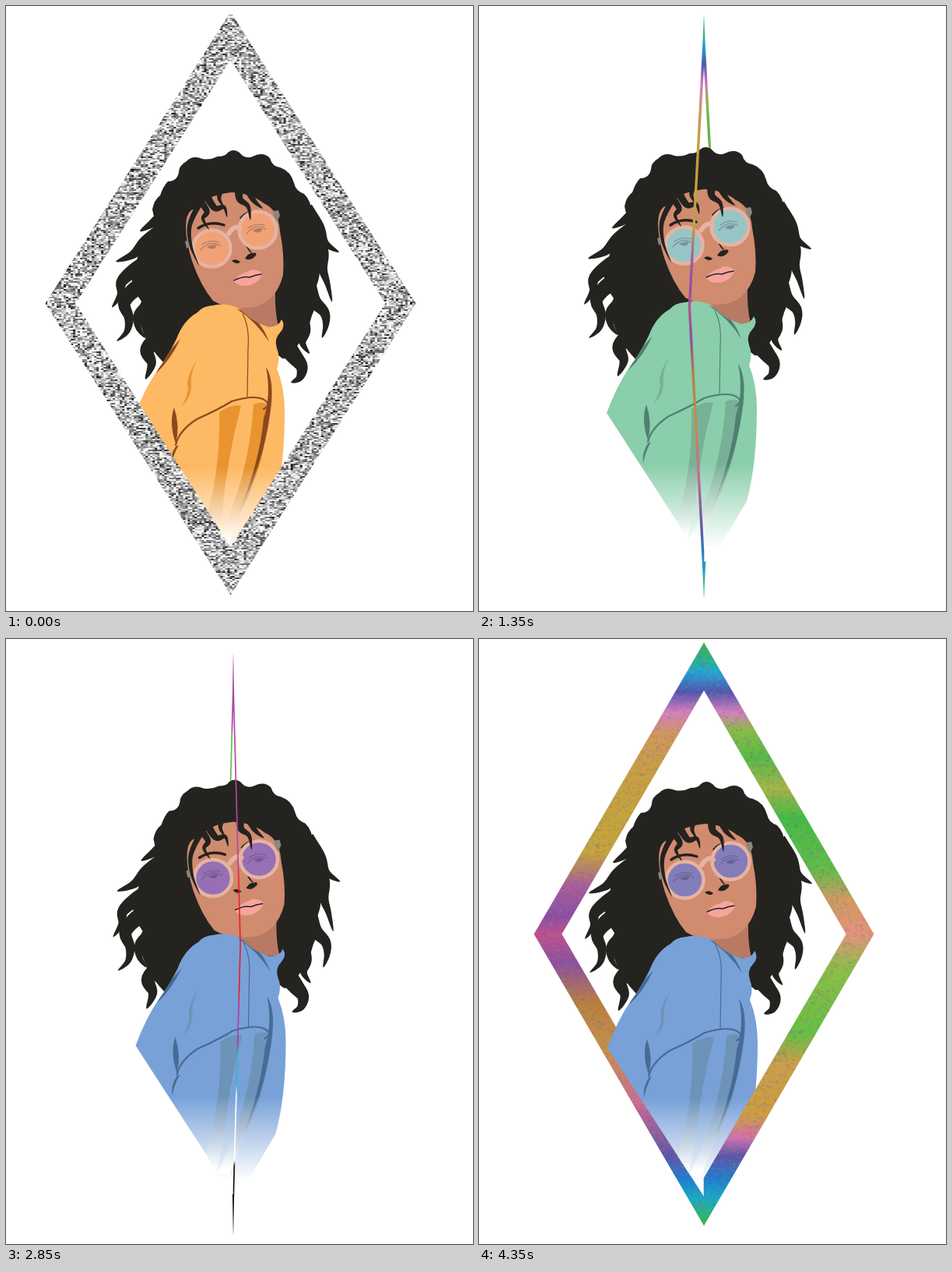
Write an HTML page with a canvas that moves like this. It is 600x776 px and loops after 4450 ms.

```html
<!DOCTYPE html>
<html lang="en">
<head>
<meta charset="utf-8">
<title>Turning diamond portrait</title>
<style>
html, body { margin: 0; width: 100%; height: 100%; overflow: hidden; background: #fff; }
canvas { display: block; width: 600px; height: 776px; }
</style>
</head>
<body>
<canvas id="stage" width="600" height="776"></canvas>
<script>
const LOOP = 4450, HALF_W = 238, HALF_H = 374.5, INNER = 0.836;
const ctx = document.getElementById('stage').getContext('2d');

// time, turn angle, diamond x, diamond y, portrait dx, portrait dy
const KEYS = [
  [0, 0, 288.5, 381.5, 0, -1],
  [600, 62.2, 289, 380.5, 0, 0],
  [1350, 85.1, 289, 386, -1, -5],
  [2050, 89.6, 293, 392.5, 2, -6],
  [2850, 92.4, 292, 391.5, 1.5, -5.5],
  [3650, 109.3, 288.5, 385, 0, -1.5],
  [4050, 130.4, 288.7, 379.5, 0, -2.5],
  [4350, 156.6, 289, 378.5, 0, -3],
  [4450, 170, 288.5, 381, 0, -1]
];

const SHIRTS = {
  yellow: ['#fdb964', '#e8942f', '#8c481d'],
  mint: ['#8aceab', '#78b197', '#4f8072'],
  lime: ['#a1d35b', '#90b364', '#6a8d3d'],
  blue: ['#78a1d8', '#6d93b9', '#466c96'],
  pink: ['#c577b9', '#ad70a8', '#89517f']
};

// until, shirt, lens, texture
const LOOKS = [
  [300, 'yellow', '#f0a276', 'noise'],
  [950, 'yellow', '#ee7a8a', 'collage'],
  [1700, 'mint', '#97c5c6', 'rainbow'],
  [2450, 'lime', '#97c5c6', 'noise'],
  [3250, 'blue', '#976fb4', 'threads'],
  [4000, 'pink', '#8fc47f', 'rainbow'],
  [LOOP, 'blue', '#837db9', 'rainbow']
];

const RAINBOW_TIP = '0 #3ab54a,.03 #2bb08a,.05 #1fa9d6,.085 #5156b0,';
const RAINBOW_END = ',.88 #5f55a8,.92 #1f7fd0,.95 #18a8c8,.98 #2eb380,1 #3ab54a';
const BANDS = {
  rainbow: [
    RAINBOW_TIP + '.12 #d77fc0,.16 #d0985c,.24 #c9a040,.36 #c4a53c,.42 #a85a9e,.47 #8a4fa5,.5 #c05090,.55 #8d50a0,.62 #b9803f,.7 #c8924a,.79 #cc6a94' + RAINBOW_END,
    RAINBOW_TIP + '.12 #d77fc0,.15 #8cbb4a,.2 #55bb46,.25 #a8b548,.3 #45bb45,.39 #62bd48,.44 #d29a62,.5 #e5937c,.56 #8cc044,.67 #66bf46,.72 #c9a04c,.81 #d09c40,.85 #d270b0' + RAINBOW_END
  ],
  collage: [
    '0 #888,.06 #c8c8cc,.12 #909090,.2 #b0b0b0,.245 #777,.265 #d8d040,.295 #eede20,.31 #e8201c,.39 #ee1c24,.41 #2bb7d6,.45 #35a0d0,.465 #7a369f,.7 #8e2c98,1 #9c2a94',
    '0 #888,.05 #bbb,.14 #f2f2f6,.165 #a2329c,.23 #a2329c,.25 #e89030,.265 #f0e428,.29 #c8dc30,.4 #2bb7b8,.6 #159ea8,.7 #1cb4bc,.77 #8e2c98,1 #9c2a94'
  ],
  threads: [
    '0 #a040a0,.13 #a84c9c,.15 #62c83c,.24 #58b848,.3 #667,.6 #69a,.75 #567,.88 #222,1 #111',
    '0 #b04aa4,.36 #b4489c,.39 #f02030,.58 #e81c28,.61 #b03ca0,.67 #b03ca0,.69 #30b8cc,.74 #30b8cc,.76 #fff,.87 #fff,.88 #111,1 #111'
  ]
};

function seeded(seed) {
  return () => {
    seed = (seed * 1664525 + 1013904223) >>> 0;
    return seed / 4294967296;
  };
}

function makeTexture(kind) {
  const rand = seeded(42), w = HALF_W * 2, h = HALF_H * 2;
  const canvas = document.createElement('canvas');
  canvas.width = w;
  canvas.height = h;
  const c = canvas.getContext('2d');
  if (kind === 'noise') {
    for (let y = 0; y < h; y += 2) {
      for (let x = 0; x < w; x += 3) {
        const v = Math.min(252, 5 + 175 * (rand() + rand()));
        c.fillStyle = `rgb(${v},${v},${v})`;
        c.fillRect(x, y, 3, 2);
      }
    }
    return canvas;
  }
  BANDS[kind].forEach((stops, side) => {
    const g = c.createLinearGradient(0, 0, 0, h);
    for (const stop of stops.split(',')) {
      const [at, color] = stop.split(' ');
      g.addColorStop(+at, color);
    }
    c.fillStyle = g;
    c.fillRect(side * w / 2, 0, w / 2, h);
  });
  if (kind === 'rainbow') {
    for (let i = 0; i < 26000; i++) {
      c.fillStyle = `hsla(${rand() * 360},60%,50%,.15)`;
      c.fillRect(rand() * w, rand() * h, 3, 2);
    }
  }
  if (kind === 'collage') {
    // woven strokes near the top
    for (let i = 0; i < 420; i++) {
      const x = rand() * w, y = rand() * h * 0.23, d = rand() < 0.5 ? 14 : -14;
      c.strokeStyle = rand() < 0.5 ? 'rgba(255,255,255,.45)' : 'rgba(60,60,65,.28)';
      c.lineWidth = 3;
      c.beginPath();
      c.moveTo(x - 18, y - d);
      c.lineTo(x + 18, y + d);
      c.stroke();
    }
  }
  return canvas;
}

const textures = {};
for (const kind of ['noise', ...Object.keys(BANDS)]) textures[kind] = makeTexture(kind);

const P = d => new Path2D(d);

// a curl through the given points, narrowing from its root to a sharp tip
function curl(width, text) {
  const pts = text.split(' ').map(p => p.split(',').map(Number));
  const at = i => pts[Math.max(0, Math.min(pts.length - 1, i))];
  const spline = (s, axis) => {
    const i = Math.min(Math.floor(s), pts.length - 2), u = s - i;
    const [a, b, c, d] = [-1, 0, 1, 2].map(k => at(i + k)[axis]);
    return b + u * (c - a + u * (2 * a - 5 * b + 4 * c - d + u * (3 * b - a - 3 * c + d))) / 2;
  };
  const left = [], right = [], n = 24, last = pts.length - 1;
  for (let k = 0; k <= n; k++) {
    const s = k / n * last, e = 0.02;
    const x = spline(s, 0), y = spline(s, 1);
    const s0 = Math.max(0, s - e), s1 = Math.min(last, s + e);
    const dx = spline(s1, 0) - spline(s0, 0), dy = spline(s1, 1) - spline(s0, 1);
    const r = width / 2 * Math.pow(1 - k / n, 0.75) / (Math.hypot(dx, dy) || 1);
    left.push([x - dy * r, y + dx * r]);
    right.unshift([x + dy * r, y - dx * r]);
  }
  return P('M' + [...left, ...right].join('L') + 'Z');
}

const HAIR = [
  P('M232 200Q240 192 252 197Q262 199 272 194Q282 194 285 189Q292 183 300 189Q307 198 317 194Q330 187 339 196Q342 207 352 208Q366 213 370 228Q372 238 383 242Q393 252 392 266Q400 276 403 292Q408 305 402 320Q406 345 398 362Q402 380 393 398Q388 420 372 440Q364 455 355 453L346 446 330 400 270 390 240 430 212 454 202 458Q185 440 178 424Q166 395 174 380Q160 360 162 346Q166 334 170 320Q174 305 188 290Q193 280 188 262Q190 250 198 244Q202 232 208 226Q220 226 222 214Q222 206 232 200Z'),
  curl(18, '204,268 188,280 172,290'),
  curl(24, '205,288 180,304 163,320 141,329'),
  curl(24, '195,325 168,338 149,354 147,371 136,388'),
  curl(24, '190,352 166,364 152,382 158,401 155,419 142,431'),
  curl(18, '190,380 171,396 170,413 179,427'),
  curl(26, '206,420 182,441 187,460 179,480'),
  curl(22, '384,262 401,285 410,305 428,317'),
  curl(20, '390,285 406,314 407,338 413,357 419,381'),
  curl(22, '386,350 395,378 409,394 411,410 406,427'),
  curl(20, '376,390 384,416 381,433 390,447'),
  curl(26, '356,432 370,450 380,464 377,478 366,484')
];
const NECK = P('M280 380L346 364Q345 392 350 412L325 412 292 390Z');
const FACE = P('M231 285Q231 268 238 263Q246 260 252 254Q266 242 290 240Q315 241 331 254Q350 262 352 290Q358 320 356 346Q351 366 338 378Q324 389 304 388Q282 389 266 379Q250 360 239 328Q231 302 231 285Z');
const FRINGE = [
  curl(8, '250,252 236,282 238,310 248,334'),
  curl(10, '245,246 258,264 253,274 261,288'),
  curl(11, '255,240 268,260 280,259 284,272'),
  curl(8, '276,236 274,248 280,259'),
  curl(12, '300,230 300,248 311,258 314,276'),
  curl(11, '310,234 318,250 330,261')
];
const MARKS = [
  [3.4, 'M247 286Q262 276 280 282'],
  [3.4, 'M302 273Q311 262 330 265'],
  [1.6, 'M307 301Q309 312 315 317']
].map(([w, d]) => [w, P(d)]);
const NOSE = P('M290 328Q295 324 301 329Q297 334 290 328M307 325Q311 318 316 318Q323 316 321 321Q314 329 307 325Z');
const LIPS = P('M292 353Q302 343 310 342Q316 337 322 340Q329 341 329 346Q322 360 306 360Q297 360 292 353Z');
const LIP_LINE = P('M293 353Q305 347 313 349Q320 346 328 345');
const EYES = P('M250 314Q262 300 276 309M252 307Q262 300 274 304M309 293Q321 279 334 287M311 286Q320 279 332 282');
const IRISES = P('M258 310Q265 306 271 308Q267 316 258 310M317 289Q324 284 330 287Q325 295 317 289Z');
const BRIDGE = P('M286 293Q294 281 301 286');
const TEMPLE = P('M343 264L350 263 352 270 348 278 345 276ZM230 303L235 301 237 309 232 312Z');

const SHIRT = P('M165 527Q178 492 195 467Q206 454 219 428Q228 404 246 394Q252 386 266 385Q284 381 300 389Q316 406 335 412Q350 414 354 403Q360 411 352 420Q344 428 348 440Q353 452 348 466Q358 490 358 522Q358 592 345 640L300 716 289 718Z');
const FOLDS_MID = [
  'M274 522Q290 511 302 514Q284 580 278 650L268 692 254 670Q276 600 274 522Z',
  'M318 512Q338 505 336 520Q336 582 302 650L285 694 270 690Q312 610 318 512Z'
].map(P);
const FOLDS_DARK = [
  'M216 516Q209 536 218 562Q224 540 216 516Z',
  'M224 428Q206 446 193 472Q212 454 224 428Z',
  'M334 464Q346 482 339 526Q330 590 298 654Q326 586 331 530Q341 500 334 464Z',
  'M296 389Q326 398 338 432Q322 406 296 389Z',
  'M218 566Q210 578 212 592Q214 578 222 564Z'
].map(P);
const SEAMS = [
  [2.2, 'M218 564Q222 546 245 531Q274 518 290 508Q327 497 336 510Q338 514 331 518'],
  [1.2, 'M304 396Q313 412 311 440L310 502']
].map(([w, d]) => [w, P(d)]);
const SLEEVE_FOLD = P('M245 456Q230 478 234 492Q232 505 225 515Q238 504 238 488Q236 474 245 456Z');

function fill(color, ...paths) {
  ctx.fillStyle = color;
  for (const p of paths) ctx.fill(p);
}
function stroke(color, width, path) {
  ctx.strokeStyle = color;
  ctx.lineWidth = width;
  ctx.stroke(path);
}
function fading(color, end) {
  const g = ctx.createLinearGradient(0, 592, 0, end);
  g.addColorStop(0, color);
  g.addColorStop(1, '#fff');
  return g;
}

function drawShirt([base, mid, dark]) {
  fill(fading(base, 700), SHIRT);
  ctx.save();
  ctx.clip(SHIRT);
  fill(fading(mid, 685), ...FOLDS_MID);
  fill(fading(dark, 670), ...FOLDS_DARK);
  for (const [w, p] of SEAMS) stroke(dark, w, p);
  fill(mid, SLEEVE_FOLD);
  ctx.restore();
}

function drawGlasses(lens) {
  fill('#8c8580', TEMPLE);
  for (const [x, y] of [[264.5, 312], [323.5, 288]]) {
    const rim = new Path2D();
    rim.ellipse(x, y, 24, 23.5, 0, 0, Math.PI * 2);
    fill(lens, rim);
    stroke('#e6b3a2', 4.5, rim);
  }
  stroke('#e6b3a2', 6, BRIDGE);
  ctx.globalAlpha = 0.3;
  stroke('#3a3040', 1.3, EYES);
  fill('#2a2430', IRISES);
  ctx.globalAlpha = 1;
}

function drawPortrait(dx, dy, shirt, lens) {
  const ink = '#24231f';
  ctx.save();
  ctx.translate(dx, dy);
  ctx.lineCap = ctx.lineJoin = 'round';
  fill(ink, ...HAIR);
  fill('#b97a63', NECK);
  fill('#d18b6f', FACE);
  for (const [w, p] of MARKS) stroke(ink, w, p);
  fill(ink, NOSE);
  fill('#f6a49c', LIPS);
  stroke(ink, 1.5, LIP_LINE);
  drawGlasses(lens);
  fill(ink, ...FRINGE);
  drawShirt(SHIRTS[shirt]);
  ctx.restore();
}

function drawBand(side, cx, cy, w, texture) {
  const mid = cx - side * 0.3, h = HALF_H * INNER;
  ctx.save();
  ctx.beginPath();
  ctx.moveTo(mid, cy - HALF_H);
  ctx.lineTo(cx + side * w, cy);
  ctx.lineTo(mid, cy + HALF_H);
  ctx.lineTo(mid, cy + h);
  ctx.lineTo(cx + side * w * INNER, cy);
  ctx.lineTo(mid, cy - h);
  ctx.closePath();
  ctx.clip();
  ctx.drawImage(textures[texture], cx - w - 0.5, cy - HALF_H, w * 2 + 1, HALF_H * 2);
  ctx.restore();
}

// the rim of the diamond, visible only while it is nearly edge-on
function drawEdge(cx, cy, w) {
  ctx.globalAlpha = Math.max(0, 1 - w / 7);
  ctx.fillStyle = '#666';
  ctx.fillRect(cx - 0.5, cy - HALF_H, 1, HALF_H * 2);
  ctx.globalAlpha = 1;
}

// smooth interpolation that never overshoots a key
function sample(t, col) {
  let i = 0;
  while (i < KEYS.length - 2 && t >= KEYS[i + 1][0]) i++;
  const rate = k => (KEYS[k + 1][col] - KEYS[k][col]) / (KEYS[k + 1][0] - KEYS[k][0]);
  const slope = k => {
    if (k === 0) return rate(0);
    if (k === KEYS.length - 1) return rate(k - 1);
    const a = rate(k - 1), b = rate(k);
    return a * b > 0 ? 2 * a * b / (a + b) : 0;
  };
  const [a, b] = [KEYS[i], KEYS[i + 1]], span = b[0] - a[0];
  const u = (t - a[0]) / span, v = 1 - u;
  return a[col] * v * v * (1 + 2 * u) + b[col] * u * u * (3 - 2 * u) +
    span * u * v * (slope(i) * v - slope(i + 1) * u);
}

// the picture advances in 100 ms steps, with two faster 50 ms runs
function stepTime(t) {
  if ((t >= 800 && t < 1050) || (t >= 3350 && t < 3650)) return Math.floor(t / 50) * 50;
  return t < 800 ? Math.floor(t / 100) * 100 : Math.floor((t - 50) / 100) * 100 + 50;
}

function draw(t) {
  const [angle, cx, cy, dx, dy] = [1, 2, 3, 4, 5].map(col => sample(t, col));
  const [, shirt, lens, texture] = LOOKS.find(look => t < look[0]);
  const w = Math.max(1.5, Math.abs(Math.cos(angle * Math.PI / 180)) * HALF_W);
  const front = angle < 90 ? -1 : 1, flat = angle < 3;
  ctx.fillStyle = '#fff';
  ctx.fillRect(0, 0, 600, 776);
  if (!flat) drawBand(-front, cx, cy, w, texture);
  drawPortrait(dx, dy, shirt, lens);
  if (flat) drawBand(-front, cx, cy, w, texture);
  drawBand(front, cx, cy, w, texture);
  drawEdge(cx, cy, w);
}

const start = performance.now();
function tick() {
  draw(stepTime((performance.now() - start) % LOOP));
  requestAnimationFrame(tick);
}
tick();
</script>
</body>
</html>
```
